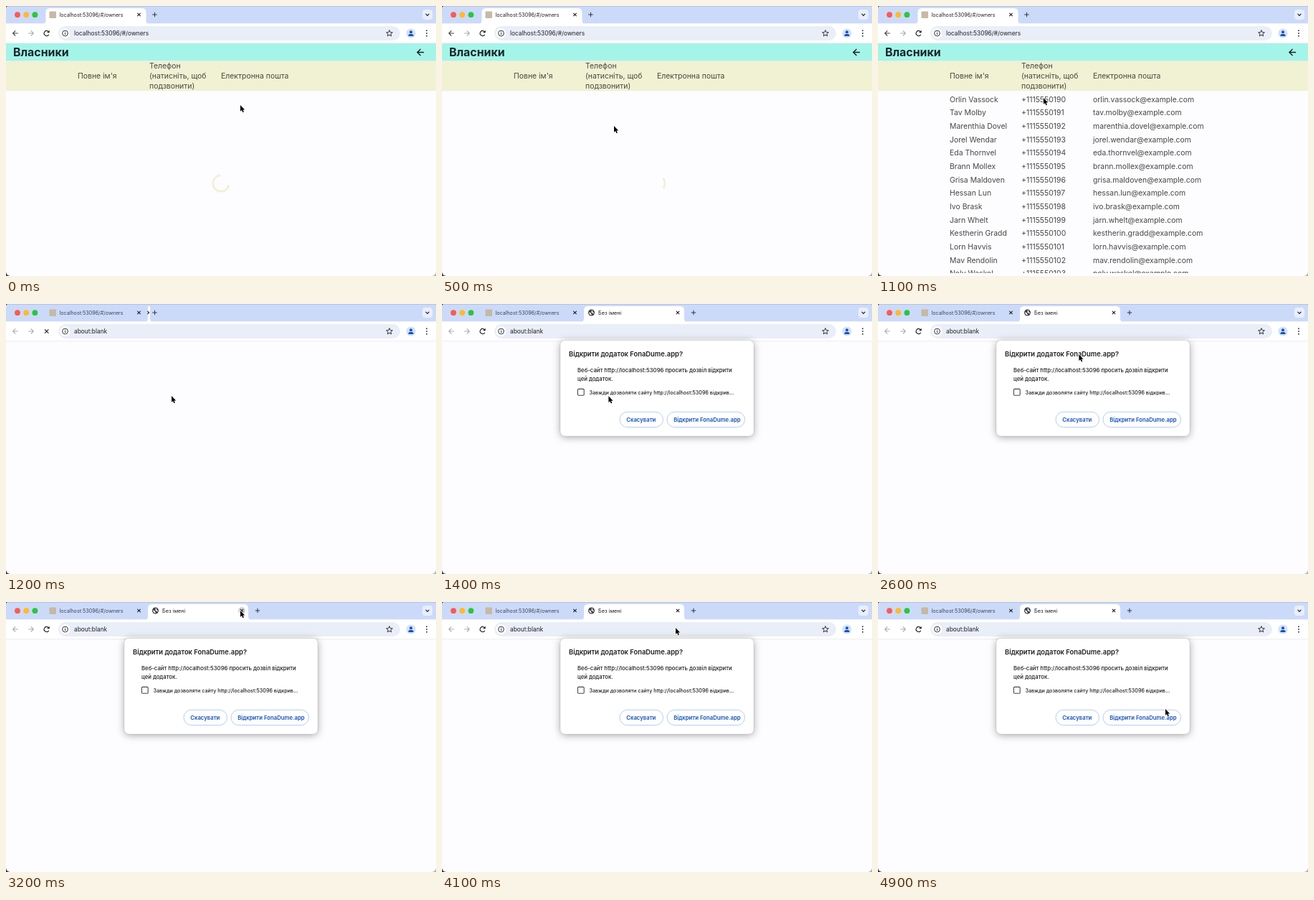
These frames come from a looping animation (600 by 376 pixels, 5000 ms). An HTML page with a canvas:

```html
<!DOCTYPE html>
<html lang="uk">
<head>
<meta charset="utf-8">
<title>Власники</title>
<style>
html, body { margin: 0; width: 100%; height: 100%; overflow: hidden; background: #fdfcfe; }
canvas { display: block; width: 600px; height: 376px; }
</style>
</head>
<body>
<canvas id="stage"></canvas>
<script>
const W = 600, H = 376, LOOP = 5000, TICK = 100;
const TAU = Math.PI * 2;
const canvas = document.getElementById('stage');
const ratio = window.devicePixelRatio || 1;
canvas.width = W * ratio;
canvas.height = H * ratio;
const ctx = canvas.getContext('2d');

const STRIP = '#ccdafa', PAGE = '#fdfcfe', INK = '#1f1f1f', MUTED = '#a9abaf', BLUE = '#1552b6';
const APP = 'FonaDume.app', HOST = 'http://localhost:53096';
const LIST_AT = 600, OPEN_AT = 1200, LOADED_AT = 1400, DIALOG_AT = 1400;

const people = [
  'Orlin Vassock', 'Tav Molby', 'Marenthia Dovel', 'Jorel Wendar', 'Eda Thornvel',
  'Brann Mollex', 'Grisa Maldoven', 'Hessan Lun', 'Ivo Brask', 'Jarn Whelt',
  'Kestherin Gradd', 'Lorn Havvis', 'Mav Rendolin', 'Nolv Waskel'
];

// time, x, y of the pointer tip
const pointerKeys = [
  [0, 327, 138], [500, 240, 167], [1100, 231, 128], [1200, 231, 128], [1600, 233.8, 128.5],
  [2000, 233.8, 128.5], [3200, 327, 12], [3800, 327, 12], [4400, 325, 60], [4900, 401, 149]
];

const clamp = v => Math.max(0, Math.min(1, v));
const mix = (a, b, k) => a + (b - a) * k;
const smooth = k => k * k * (3 - 2 * k);

// cubic-bezier(.4, 0, .2, 1)
function fastOutSlowIn(x) {
  x = clamp(x);
  let lo = 0, hi = 1, u = x;
  for (let i = 0; i < 20; i++) {
    u = (lo + hi) / 2;
    const bx = 1.2 * u * (1 - u) ** 2 + 0.6 * u * u * (1 - u) + u ** 3;
    if (bx < x) lo = u; else hi = u;
  }
  return u * u * (3 - 2 * u);
}

function text(str, x, y, size, color = INK, weight = 400) {
  ctx.font = `${weight} ${size}px Inter, "Open Sans", sans-serif`;
  ctx.fillStyle = color;
  ctx.fillText(str, x, y);
}

function rect(x, y, w, h, color) {
  ctx.fillStyle = color;
  ctx.fillRect(x, y, w, h);
}

function round(x, y, w, h, r, fill, line, width = 0.8) {
  ctx.beginPath();
  ctx.roundRect(x, y, w, h, r);
  if (fill) { ctx.fillStyle = fill; ctx.fill(); }
  if (line) { ctx.strokeStyle = line; ctx.lineWidth = width; ctx.stroke(); }
}

function disc(x, y, r, color) {
  ctx.beginPath();
  ctx.arc(x, y, r, 0, TAU);
  ctx.fillStyle = color;
  ctx.fill();
}

function arc(x, y, r, from, to, color, width) {
  ctx.beginPath();
  ctx.arc(x, y, r, from, to);
  ctx.strokeStyle = color;
  ctx.lineWidth = width;
  ctx.stroke();
}

function lines(x, y, paths, color = INK, width = 1.1) {
  ctx.beginPath();
  for (const p of paths) {
    ctx.moveTo(x + p[0], y + p[1]);
    for (let i = 2; i < p.length; i += 2) ctx.lineTo(x + p[i], y + p[i + 1]);
  }
  ctx.strokeStyle = color;
  ctx.lineWidth = width;
  ctx.stroke();
}

function polygon(x, y, pts) {
  ctx.beginPath();
  for (let i = 0; i < pts.length; i += 2) ctx.lineTo(x + pts[i], y + pts[i + 1]);
  ctx.closePath();
}

const cross = (x, y, r, width) => lines(x, y, [[-r, -r, r, r], [-r, r, r, -r]], INK, width);
const plus = (x, y) => lines(x, y, [[-3.2, 0, 3.2, 0], [0, -3.2, 0, 3.2]], '#30343c', 1);

function arrow(x, y, r, dir, color, width) {
  lines(x, y, [[-r * dir, 0, r * dir, 0], [0, -r, r * dir, 0, 0, r]], color, width);
}

function tabShape(x, w) {
  const r = Math.min(6, w / 2), right = x + w;
  ctx.beginPath();
  ctx.moveTo(x - 4, 25);
  ctx.quadraticCurveTo(x, 25, x, 20);
  ctx.lineTo(x, 3 + r);
  ctx.quadraticCurveTo(x, 3, x + r, 3);
  ctx.lineTo(right - r, 3);
  ctx.quadraticCurveTo(right, 3, right, 3 + r);
  ctx.lineTo(right, 20);
  ctx.quadraticCurveTo(right, 25, right + 4, 25);
  ctx.fillStyle = '#fff';
  ctx.fill();
}

function globe(x, y) {
  disc(x, y, 4.5, '#3c4046');
  ctx.fillStyle = '#fff';
  polygon(x, y, [-3.6, -0.8, -1, 0.2, -0.6, 1.6, 0.3, 2, -0.2, 3.6, -2.4, 2.6]);
  ctx.fill();
  polygon(x, y, [0, -3.4, 2, -2.6, 1.4, -1, 3.4, 0, 3, 1.8, 1.4, 0.4, -0.4, -0.4, 0.4, -1.6]);
  ctx.fill();
}

function reloadIcon(x, y) {
  arc(x, y, 3.5, 0.5, 5.5, INK, 1.1);
  ctx.fillStyle = INK;
  polygon(x, y, [4, -4.3, 4, -0.7, 0.4, -0.7]);
  ctx.fill();
}

function star(x, y) {
  const pts = [];
  for (let i = 0; i < 10; i++) {
    const r = i % 2 ? 2 : 4.6, a = i * TAU / 10 - TAU / 4;
    pts.push(r * Math.cos(a), r * Math.sin(a));
  }
  polygon(x, y, pts);
  ctx.strokeStyle = '#33363b';
  ctx.lineWidth = 1;
  ctx.stroke();
}

function tabStrip(t, hover) {
  rect(0, 0, W, 25, STRIP);
  rect(0, 0, W, 0.6, '#a8b3cb');
  ['#fb5a55', '#fdbb2d', '#2ac640'].forEach((c, i) => disc(16 + i * 12.2, 12.2, 3.9, c));

  const opened = t >= OPEN_AT;
  const grow = fastOutSlowIn((t - OPEN_AT) / 200);
  const width = mix(3, 140, grow);
  if (opened) tabShape(198, width); else tabShape(55.5, 140);

  round(60.5, 7.5, 9.5, 9.5, 1, '#c7b9a3');
  text('localhost:53096/#/owners', 74.5, 15, 7.15, opened ? '#3f444f' : INK);
  cross(185.5, 12, 2.2, 1.1);

  if (opened) {
    ctx.save();
    ctx.beginPath();
    ctx.rect(197, 3, width, 22);
    ctx.clip();
    if (grow > 0.3) {
      globe(208.5, 12);
      text('Без імені', 218, 15, 7.3);
    }
    const closeX = mix(199.5, 329, grow);
    if (hover) disc(closeX, 12, 5, '#d3d5da');
    cross(closeX, 12, 2.2, 1.1);
    ctx.restore();
  }
  plus(mix(207.5, 351, grow), 12);

  round(581, 5, 14, 14, 4, '#e8eefd');
  lines(588, 12, [[-2.4, -1.2, 0, 1.3, 2.4, -1.2]], INK, 1.2);
}

function toolbar(t) {
  const opened = t >= OPEN_AT;
  rect(0, 24.3, W, 27.7, '#fff');
  rect(0, 51.5, W, 0.7, '#e4e6eb');
  arrow(13.2, 38, 3.6, -1, opened ? MUTED : '#3f4247', 1.1);
  arrow(34.7, 38, 3.6, 1, MUTED, 1.1);
  if (opened && t < LOADED_AT) cross(56.7, 38, 2.7, 1.1);
  else reloadIcon(56.7, 38);

  round(73, 28, 477, 20, 10, '#e9eef8');
  disc(82.5, 38, 7, '#fff');
  arc(82.5, 38, 3.9, 0, TAU, '#303338', 1);
  rect(82, 37.3, 1, 2.7, '#303338');
  rect(82, 35.5, 1, 1, '#303338');
  text(opened ? 'about:blank' : 'localhost:53096/#/owners', 95, 41, 8.35);

  star(535, 38.2);
  disc(565, 38, 6.6, '#d3e2fc');
  disc(565, 36.2, 2, BLUE);
  round(561.4, 39, 7.2, 3, [2.5, 2.5, 0.5, 0.5], BLUE);
  [34.2, 38, 41.8].forEach(y => disc(587, y, 0.95, '#2e3136'));
}

function spinner(t) {
  const p = (0.35 + t / 1333) % 1;
  const turn = 0.2 + t / 2222;
  const head = fastOutSlowIn(p * 2), tail = fastOutSlowIn(p * 2 - 1);
  const start = -TAU / 4 + tail * TAU * 0.75 + turn * TAU + p * TAU / 4;
  const sweep = Math.max((head - tail) * TAU * 0.75, 0.01);
  arc(300, 247, 11.2, start, start + sweep, '#f1f1d3', 2.7);
}

function ownersPage(t) {
  const ink = '#484844';
  rect(0, 52, W, 24.6, '#a5f4ea');
  text('Власники', 10, 70.2, 15.9, '#16282a', 700);
  arrow(578.5, 64.5, 4.6, -1, INK, 1.4);

  rect(0, 76.6, W, 41.6, '#f1f1d3');
  text("Повне ім'я", 100, 101, 10.45, ink);
  ['Телефон', '(натисніть, щоб', 'подзвонити)'].forEach((s, i) => text(s, 200, 87 + i * 14, 10.45, ink));
  text('Електронна пошта', 300, 101, 10.45, ink);

  if (t < LIST_AT) return spinner(t);
  ctx.save();
  ctx.beginPath();
  ctx.rect(0, 118, W, 254);
  ctx.clip();
  people.forEach((name, i) => {
    const y = 133.6 + i * 18.67;
    const lastDigits = String((90 + i) % 100).padStart(2, '0');
    text(name, 100, y, 10.45, ink);
    text('+11155501' + lastDigits, 200, y, 10.45, ink);
    text(name.toLowerCase().replace(' ', '.') + '@example.com', 300, y, 10.45, ink);
  });
  ctx.restore();
}

function dialog() {
  ctx.save();
  ctx.shadowColor = 'rgba(0,0,0,.34)';
  ctx.shadowBlur = 11 * ratio;
  ctx.shadowOffsetY = 1.5 * ratio;
  round(165, 50.5, 270, 133.5, 6.5, '#fff');
  ctx.restore();
  round(165, 50.5, 270, 133.5, 6.5, null, 'rgba(0,0,0,.12)');

  text(`Відкрити додаток ${APP}?`, 177, 73, 9.4, INK, 600);
  text(`Веб-сайт ${HOST} просить дозвіл відкрити`, 189, 95.3, 7.75, INK, 500);
  text('цей додаток.', 189, 107.3, 7.75, INK, 500);
  round(189.4, 118.4, 8.8, 8.8, 1.2, null, '#45484e', 1.1);
  text(`Завжди дозволяти сайту ${HOST} відкрив...`, 205.5, 125.5, 7.15, INK, 500);

  round(248, 150.3, 60.5, 21.2, 10.6, '#fff', '#a3c0f2');
  text('Скасувати', 257.3, 163.8, 7.75, BLUE, 600);
  round(314, 150.3, 108.5, 21.2, 10.6, '#fff', '#a3c0f2');
  text(`Відкрити ${APP}`, 323.2, 163.8, 7.75, BLUE, 600);
}

function pointerAt(t) {
  let i = 0;
  while (i < pointerKeys.length - 2 && t >= pointerKeys[i + 1][0]) i++;
  const [t0, x0, y0] = pointerKeys[i], [t1, x1, y1] = pointerKeys[i + 1];
  const k = smooth(clamp((t - t0) / (t1 - t0)));
  return [mix(x0, x1, k), mix(y0, y1, k)];
}

function pointer(x, y) {
  polygon(x, y, [0, 0, 0, 8.8, 2, 7, 3.4, 10.2, 4.9, 9.6, 3.5, 6.5, 6.2, 6.4]);
  ctx.lineJoin = 'round';
  ctx.strokeStyle = '#fff';
  ctx.lineWidth = 1.3;
  ctx.stroke();
  ctx.fillStyle = '#000';
  ctx.fill();
  ctx.lineJoin = 'miter';
}

function draw(t) {
  const [px, py] = pointerAt(t);
  const hover = t >= OPEN_AT && Math.hypot(px - 329, py - 12) < 7;
  ctx.setTransform(ratio, 0, 0, ratio, 0, 0);
  rect(0, 0, W / 2, H, '#343047');
  rect(W / 2, 0, W / 2, H, '#a9adb5');

  ctx.save();
  ctx.beginPath();
  ctx.roundRect(0, 0, W, H, [4, 4, 6, 6]);
  ctx.clip();
  rect(0, 0, W, H, PAGE);
  tabStrip(t, hover);
  toolbar(t);
  if (t < OPEN_AT) ownersPage(t);
  else if (t >= DIALOG_AT) dialog();
  ctx.restore();

  pointer(px, py);
}

const begin = performance.now();
function frame() {
  const t = (performance.now() - begin) % LOOP;
  draw(Math.floor(t / TICK) * TICK);
  requestAnimationFrame(frame);
}
frame();
</script>
</body>
</html>
```
